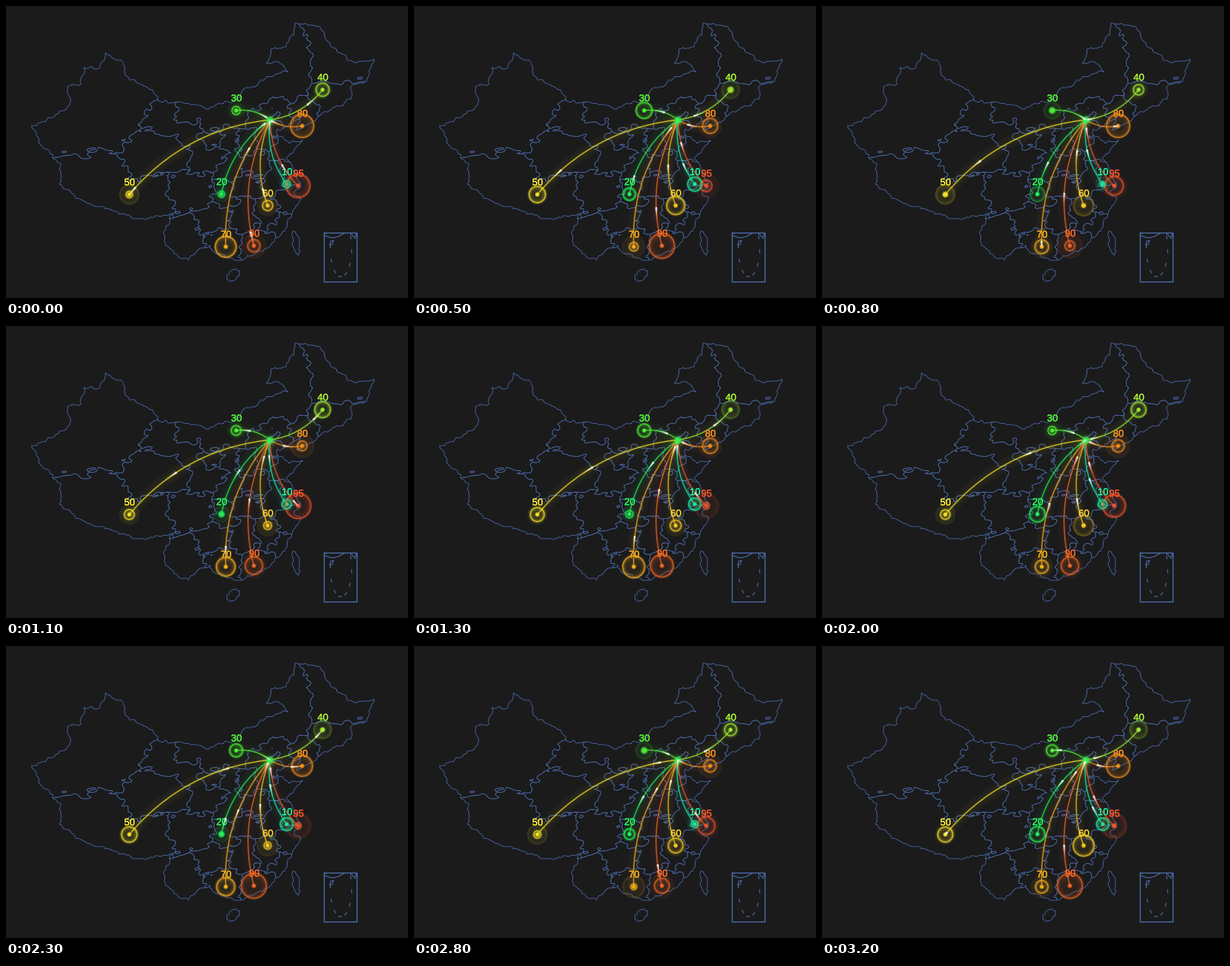
These frames come from a looping animation (600 by 436 pixels, 3.3 s). A matplotlib script:

```python
import numpy as np
import matplotlib.pyplot as plt
from matplotlib.animation import FuncAnimation
from matplotlib.collections import LineCollection
from matplotlib.patches import Polygon
from matplotlib.patheffects import withStroke

W, H, DPI = 600, 436, 100
PX = 72 / DPI
FRAMES, STEP = 33, 100
BACK, BORDER = "#1b1b1c", "#4968a4"
HUB = np.array([394.0, 170.0])

fig = plt.figure(figsize=(W / DPI, H / DPI), dpi=DPI, facecolor=BACK)
ax = fig.add_axes([0, 0, 1, 1])
ax.set_xlim(0, W)
ax.set_ylim(H, 0)
ax.axis("off")
rng = np.random.default_rng(11)


# ---- map ----
def roughen(pts):
    """Split long segments, pushing each midpoint sideways."""
    out = [pts[0]]
    for a, b in zip(pts[:-1], pts[1:]):
        d = b - a
        length = np.hypot(*d)
        if length > 4:
            push = rng.uniform(-1, 1) * min(0.24 * length, 2.6) / length
            mid = (a + b) / 2 + push * np.array([d[1], -d[0]])
            out += list(roughen(np.array([a, mid, b]))[1:])
        else:
            out.append(b)
    return np.array(out)


def land(pts):
    shape = Polygon(roughen(np.array(pts, float)), closed=True, fill=False,
                    ec=BORDER, lw=0.95 * PX, joinstyle="round", zorder=1)
    return ax.add_patch(shape)


def island(x, y, rx, ry, lean):
    a = np.linspace(0, 2 * np.pi, 9)
    land(np.column_stack([x + rx * np.cos(a) - lean * np.sin(a), y + ry * np.sin(a)]))


FRONTIER = [(163, 307), (124, 295), (80, 266), (82, 236), (48, 203), (38, 179), (62, 167),
            (93, 150), (92, 121), (112, 116), (116, 92), (137, 94), (148, 70), (175, 87),
            (184, 110), (218, 125), (228, 142), (272, 145), (299, 154), (344, 141),
            (355, 124), (402, 102), (421, 98), (409, 86), (389, 86), (396, 64), (418, 61),
            (430, 43), (431, 26), (467, 30), (485, 60), (516, 82), (549, 79), (534, 115),
            (516, 119), (515, 139), (483, 156), (460, 172)]
COAST = [(435, 186), (440, 166), (405, 184), (406, 194), (422, 205), (443, 201), (418, 228),
         (440, 266), (430, 278), (440, 287), (425, 317), (408, 345), (387, 362), (344, 380),
         (338, 377), (312, 369), (304, 357), (286, 365), (272, 379), (251, 370), (237, 347),
         (246, 310), (192, 318), (163, 307)]
mainland = land(FRONTIER + COAST)
island(339, 402, 9.5, 9.5, 4)
island(432.5, 354, 5, 18, -4)

# each province owns the land nearest to its seats
SEATS = {
    "Xinjiang": [(100, 190), (165, 180), (200, 130)],
    "Tibet": [(110, 255), (150, 255), (230, 285)],
    "Qinghai": [(205, 222), (250, 217)],
    "Gansu": [(240, 165), (275, 190), (295, 225), (315, 222)],
    "Inner Mongolia": [(270, 160), (310, 165), (345, 160), (385, 139), (425, 125),
                       (430, 90), (430, 60)],
    "Ningxia": [(308, 202)], "Shaanxi": [(335, 205), (330, 240)],
    "Sichuan": [(260, 280), (290, 275)], "Chongqing": [(325, 283)],
    "Hubei": [(358, 268)], "Yunnan": [(265, 345)], "Guizhou": [(313, 318)],
    "Guangxi": [(325, 352)], "Guangdong": [(380, 352)], "Hunan": [(355, 310)],
    "Jiangxi": [(392, 312)], "Fujian": [(415, 332)], "Zhejiang": [(424, 290)],
    "Anhui": [(402, 258)], "Jiangsu": [(424, 248)], "Henan": [(373, 240)],
    "Shandong": [(412, 210)], "Shanxi": [(358, 203)],
    "Hebei": [(388, 197), (380, 170), (394, 152), (412, 162)],
    "Beijing": [(394, 170)], "Tianjin": [(402, 178)], "Liaoning": [(440, 158)],
    "Jilin": [(480, 135)], "Heilongjiang": [(480, 95), (470, 50)],
}
gx, gy = np.meshgrid(np.arange(30, 560, 1.5), np.arange(15, 390, 1.5))


def ripple():
    """Sum of random waves, the shorter the weaker."""
    total = 0
    for wave, height in ((34, 1.8), (19, 1.6), (11, 1.2), (7, 0.7)):
        for turn in rng.uniform(0, 2 * np.pi, 3):
            along = gx * np.cos(turn) + gy * np.sin(turn)
            total = total + height * np.sin(2 * np.pi * along / wave + rng.uniform(0, 6.3))
    return total


wx, wy = gx + ripple(), gy + ripple()
reaches = np.array([np.min([np.hypot(wx - x, wy - y) for x, y in seats], axis=0)
                    for seats in SEATS.values()])
for i, own in enumerate(reaches):
    rest = np.delete(reaches, i, axis=0).min(axis=0)
    edge = ax.contour(gx, gy, rest - own, levels=[0], colors=BORDER,
                      linewidths=0.8 * PX, zorder=1)
    edge.set_clip_path(mainland)

# inset: frame, a strip of coast, and dashes along a bowl
ax.plot([474.5, 524.2, 524.2, 474.5, 474.5], [338.7, 338.7, 411.7, 411.7, 338.7],
        color=BORDER, lw=1.6 * PX)
a = np.linspace(-0.45, np.pi + 0.1, 8)
spot = np.column_stack([500 + 16 * np.cos(a), 363 + 41 * np.sin(a)])
run = np.column_stack([-16 * np.sin(a), 41 * np.cos(a)])
run *= 3 / np.hypot(*run.T)[:, None]
marks = list(np.stack([spot - run, spot + run], axis=1))
sx = np.linspace(475, 505, 12)
marks += [np.column_stack([sx, 339 + 7 * np.sin(np.pi * (sx - 470) / 35)]),
          [(514, 339), (521, 347), (523, 339)],
          [(485, 351), (489, 350), (487, 356), (483, 357), (485, 351)]]
ax.add_collection(LineCollection(marks, colors=BORDER, linewidths=1.3 * PX))

# ---- routes ----
# value: x, y, pulse offset, pulses per second, comet offset
ROUTES = {
    95: (436, 268.5, 0.90, 0.98, 0.325), 90: (370, 358, 0.44, 1.11, 0.085),
    80: (442, 179, 0.97, 1.25, 0.88), 70: (328, 359.5, 0.92, 0.81, 0.735),
    60: (390.5, 298, 0.43, 0.80, 0.165), 50: (184, 281.5, 0.26, 1.085, 0.04),
    40: (472.5, 125, 0.68, 1.05, 0.305), 30: (343.5, 156, 0.43, 1.00, 0.825),
    20: (321.5, 281, 0.35, 0.82, 0.91), 10: (419, 266, 0.44, 1.06, 0.945),
}
SPEED = 71.5
value = np.array(list(ROUTES))
px, py, pulse0, pulse_rate, fly0 = np.array(list(ROUTES.values())).T
ports = np.column_stack([px, py])
delta = HUB - ports
span = np.hypot(*delta.T)
size = 10 + value / 10
ctrl = (ports + HUB) / 2 + 0.2 * np.column_stack([delta[:, 1], -delta[:, 0]])

stops = np.array([(20, 235, 220), (40, 250, 60), (250, 232, 40), (250, 165, 25), (240, 66, 48)])
hues = np.column_stack([np.interp(value, np.linspace(0, 100, 5), c) for c in stops.T / 255])


def curve(i, u):
    u = np.asarray(u)[:, None]
    return (1 - u) ** 2 * ports[i] + 2 * u * (1 - u) * ctrl[i] + u ** 2 * HUB


def tint(alpha):
    return np.column_stack([hues, np.full(len(hues), alpha)])


def area(r):
    return (2 * np.asarray(r) * PX) ** 2


paths = [curve(i, np.linspace(0, 1, 50)) for i in range(len(ROUTES))]
for width, alpha in ((19, 0.03), (11, 0.025), (4, 0.1), (1.3, 0.85)):
    ax.add_collection(LineCollection(paths, colors=tint(alpha), linewidths=width * PX, zorder=3))

for r, alpha in ((size, 0.07), (4, 0.25), (2.8, 0.95)):
    ax.scatter(px, py, s=area(r), c=tint(alpha), lw=0, zorder=4)
for (x, y), v, hue in zip(ports, value, hues):
    ax.text(x + 0.5, y - 19.2, str(v), color=hue, fontsize=14.6 * PX, family="Liberation Sans",
            ha="center", va="center_baseline", zorder=4,
            path_effects=[withStroke(linewidth=0.45 * PX, foreground=hue)])

for r, alpha in ((8, 0.12), (6, 0.3), (4.5, 0.6), (3, 0.6)):
    ax.scatter(*HUB, s=area(r), color=(0.2, 0.98, 0.35, alpha), lw=0, zorder=5)

# rings leave fading copies behind
lags = np.arange(14) * 0.035
fade = 0.15 * np.exp(-lags / 0.2)
fade[0] = 0.7
spots = np.repeat(ports, len(lags), axis=0)
ring_rgba = np.column_stack([np.repeat(hues, len(lags), axis=0), np.tile(fade, len(ROUTES))])
rings = ax.scatter(*spots.T, s=1, facecolors="none", edgecolors=ring_rgba, lw=1.7 * PX, zorder=6)
halos = ax.scatter(px, py, s=1, facecolors="none", edgecolors=tint(0.12), lw=5 * PX, zorder=6)

# comets: white head, tail in the route's colour
PARTS, TAIL = 12, 20
k = np.arange(PARTS) / PARTS
comet_rgba = np.concatenate([
    np.column_stack([1 - (1 - hue) * k[:, None] ** 1.2, 0.95 * (1 - k) ** 1.1]) for hue in hues])
widths = np.tile((2.9 - 1.7 * k) * PX, len(ROUTES))
glow = LineCollection([], colors=np.repeat(tint(0.05), PARTS, axis=0),
                      linewidths=8 * PX, zorder=7)
comets = LineCollection([], colors=comet_rgba, linewidths=widths, zorder=8)
ax.add_collection(glow)
ax.add_collection(comets)


def radius(t):
    return size * (0.1 + 0.9 * ((pulse0 + pulse_rate * t) % 1))


def draw(n):
    t = n * STEP / 1000
    radii = np.column_stack([radius(t - lag) for lag in lags])
    rings.set_sizes(area(radii.ravel()))
    halos.set_sizes(area(radii[:, 0]))
    segments = []
    for i in range(len(ROUTES)):
        head = (fly0[i] + SPEED * t / span[i]) % 1 + 4 / span[i]
        tail = head - np.linspace(0, TAIL, PARTS + 1) / span[i]
        pts = curve(i, np.clip(tail, 0, 1))
        segments += list(np.stack([pts[:-1], pts[1:]], axis=1))
    comets.set_segments(segments)
    glow.set_segments(segments)
    return rings, halos, comets, glow


anim = FuncAnimation(fig, draw, frames=FRAMES, interval=STEP, repeat=True, repeat_delay=0)
plt.show()
```
